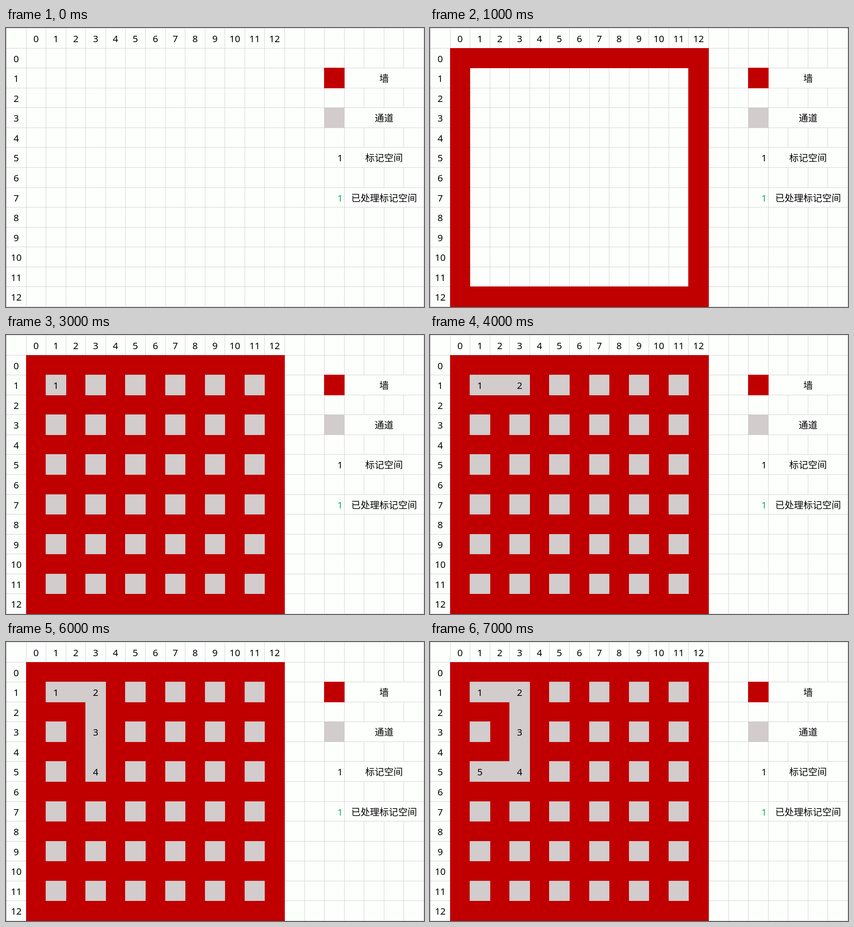
These frames come from a looping animation (916x611 px, 8 s). An HTML page with a canvas:

```html
<!DOCTYPE html>
<html lang="zh-CN">
<head>
<meta charset="utf-8">
<style>
  html, body { margin: 0; width: 916px; height: 611px; overflow: hidden; }
  canvas { display: block; }
</style>
</head>
<body>
<canvas id="stage" width="916" height="611"></canvas>
<script>
const ctx = document.getElementById('stage').getContext('2d');
const COLS = 21, ROWS = 14, SIZE = 13, STEP = 1000, LOOP = 8000;
const PAPER = '#fdfffd', LINE = '#d3d3d3', WALL = '#c00000', PATH = '#d2cccc';
const GREEN = '#00b050', BLACK = '#000';
const LEGEND = [[1, '墙'], [3, '通道'], [5, '标记空间'], [7, '已处理标记空间']];
// Rooms visited in order, as [column, row] in maze coordinates.
const ROUTE = [[1, 1], [3, 1], [3, 3], [3, 5], [1, 5]];

const edge = i => Math.round(i * 915 / COLS);

function rect(color, x, y, w, h) {
  ctx.fillStyle = color;
  ctx.fillRect(x, y, w, h);
}

// Fills a block of sheet cells including its border lines.
function block(color, col, row, cols = 1, rows = 1) {
  const x = edge(col), y = edge(row);
  rect(color, x, y, edge(col + cols) - x + 1, edge(row + rows) - y + 1);
}

function text(value, x, row, color = BLACK, align = 'center') {
  ctx.fillStyle = color;
  ctx.textAlign = align;
  ctx.fillText(value, x, edge(row) + 31);
}

const label = (value, col, row) =>
  text(value, (edge(col) + edge(col + 1) + 1) / 2, row);

function drawSheet() {
  rect(PAPER, 0, 0, 916, 611);
  for (let c = 0; c <= COLS; c++) rect(LINE, edge(c), 0, 1, 611);
  for (let r = 0; r <= ROWS; r++) rect(LINE, 0, edge(r), 916, 1);
  rect('#a8a8a8', 0, 0, 1, 611);
  rect(GREEN, 0, 0, 1, 1);

  for (let i = 0; i < SIZE; i++) {
    label(i, i + 1, 0);
    label(i, 0, i + 1);
  }
  for (const [row, name] of LEGEND) {
    const top = edge(row + 1);
    rect(PAPER, edge(17) + 1, top + 1, 915 - edge(17) - 1, edge(row + 2) - top - 1);
    text(name, 828.5, row + 1);
  }
  block(WALL, 16, 2);
  block(PATH, 16, 4);
  text('1', 738, 6, BLACK, 'right');
  text('1', 738, 8, GREEN, 'right');
}

function drawBorder() {
  block(WALL, 1, 1, SIZE, 1);
  block(WALL, 1, SIZE, SIZE, 1);
  block(WALL, 1, 1, 1, SIZE);
  block(WALL, SIZE, 1, 1, SIZE);
  rect(GREEN, 914, 0, 2, 1);
}

function drawMaze(visited) {
  block(WALL, 1, 1, SIZE, SIZE);
  for (let r = 1; r < SIZE; r += 2)
    for (let c = 1; c < SIZE; c += 2) block(PATH, c + 1, r + 1);

  const rooms = ROUTE.slice(0, visited);
  rooms.forEach(([c, r], i) => {
    if (!i) return;
    const [pc, pr] = rooms[i - 1];
    block(PATH, (c + pc) / 2 + 1, (r + pr) / 2 + 1);
  });
  rooms.forEach(([c, r], i) => label(i + 1, c + 1, r + 1));
}

function draw(now) {
  const step = Math.floor(now % LOOP / STEP);
  ctx.font = '20.6px "Noto Sans", "Noto Sans CJK SC", "Noto Sans CJK", sans-serif';
  drawSheet();
  if (step === 1) drawBorder();
  if (step >= 2) drawMaze(step - 2);
}

const start = performance.now();
function tick() {
  draw(performance.now() - start);
  requestAnimationFrame(tick);
}
tick();
</script>
</body>
</html>
```
